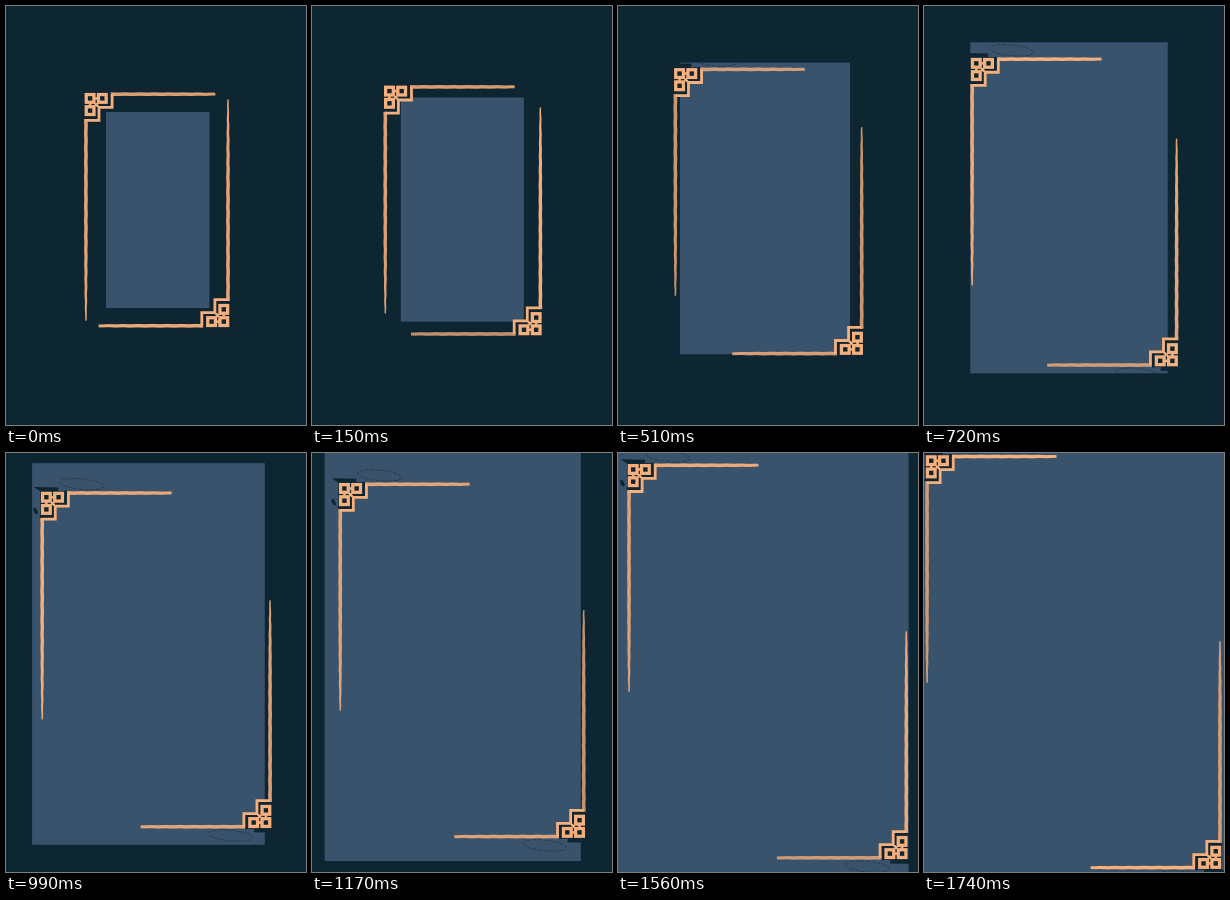
These frames come from a looping animation (300x419 px, 1.77 s). An HTML page with a canvas:

```html
<!DOCTYPE html>
<html lang="en">
<head>
<meta charset="utf-8">
<title>Corner frame</title>
<style>
html, body { margin: 0; width: 100%; height: 100%; overflow: hidden; background: #0e2532; }
canvas { display: block; }
</style>
</head>
<body>
<canvas id="stage" width="300" height="419"></canvas>
<script>
const ctx = document.getElementById('stage').getContext('2d');
const NIGHT = '#0e2532', BLUE = '#39536d', PEACH = '#f6b07d';
const STEP = 30, COUNT = 59;
const AXIS = 1.6;    // centre of the outer lines, from the corner
const STAIR = 13.1;  // size of one stair
const CELL = 12.2;   // spacing of the knot squares

// Two stairs running from the top line down to the side line.
function stairs(inset, width, color) {
  ctx.beginPath();
  for (let i = 0; i < 5; i++) {
    const x = 2 - Math.floor(i / 2), y = Math.floor((i + 1) / 2);
    ctx.lineTo(AXIS - inset + STAIR * x, AXIS - inset + STAIR * y);
  }
  ctx.lineWidth = width;
  ctx.strokeStyle = color;
  ctx.stroke();
}

// Brush stroke along x with slightly uneven edges and a narrowing tip.
function brush(from, to, width, tip) {
  ctx.fillStyle = PEACH;
  for (let x = from; x < to; x++) {
    const k = (x - from) / (to - from);
    const size = width + (tip - width) * k ** 5;
    const wobble = 0.12 * Math.sin(x * 0.43);
    ctx.fillRect(x, AXIS - size / 2 + wobble, Math.min(1.05, to - x), size);
  }
}

function block(x, y, size, color) {
  ctx.fillStyle = color;
  ctx.fillRect(x - size / 2, y - size / 2, size, size);
}

function knot() {
  const mid = 5.8 + CELL / 2;
  block(mid, mid, 5, PEACH);
  for (let i = 0; i < 3; i++) {
    const x = 5.8 + CELL * (i % 2), y = 5.8 + CELL * (i >> 1);
    block(x, y, 12.6, NIGHT);
    block(x, y, 11, PEACH);
    block(x, y, 4.4, NIGHT);
  }
  block(mid, 5.8, 2.6, PEACH);
  block(5.8, mid, 2.6, PEACH);
  block(mid, mid, 3, PEACH);
}

function oval(x, y, rx, ry, turn) {
  ctx.beginPath();
  ctx.ellipse(x, y, rx, ry, turn, 0, Math.PI * 2);
}

// Night-coloured marks that only show on top of the panel.
function shadow() {
  ctx.fillStyle = ctx.strokeStyle = NIGHT;
  ctx.beginPath();
  ctx.moveTo(-7, -4.5);
  ctx.lineTo(18, -4);
  ctx.lineTo(17, 0);
  ctx.lineTo(0, 0);
  ctx.fill();
  oval(-5, 19.5, 1.8, 3.5, -0.4);
  ctx.fill();

  ctx.save();
  ctx.globalAlpha = 0.75;
  ctx.lineWidth = 0.6;
  ctx.setLineDash([4, 1.5]);
  oval(41, -7.2, 22, 5.3, 0.1);
  ctx.stroke();
  ctx.restore();
}

function corner(x, y, turn) {
  ctx.save();
  ctx.translate(x, y);
  ctx.rotate(turn);
  shadow();
  stairs(2.5, 2.6, NIGHT);
  knot();
  stairs(0, 2.8, PEACH);
  brush(26.5, 131, 3.5, 2.8);
  ctx.transform(0, 1, 1, 0, 0, 0);
  brush(26.5, 228, 3.5, 1.3);
  ctx.restore();
}

function draw(n) {
  ctx.fillStyle = NIGHT;
  ctx.fillRect(0, 0, 300, 419);

  const left = 100 - 2.24 * n, right = 203.5 + 1.675 * n;
  const top = 106 - 2.905 * n, bottom = 302 + 2.72 * n;
  ctx.fillStyle = BLUE;
  ctx.fillRect(left, top, right - left, bottom - top);

  corner(78.3 - 1.325 * n, 86.6 - 1.46 * n, 0);
  corner(223.6 + 1.275 * n, 321.4 + 1.635 * n, Math.PI);
}

function tick() {
  draw(Math.floor(performance.now() / STEP) % COUNT);
  requestAnimationFrame(tick);
}
tick();
</script>
</body>
</html>
```
